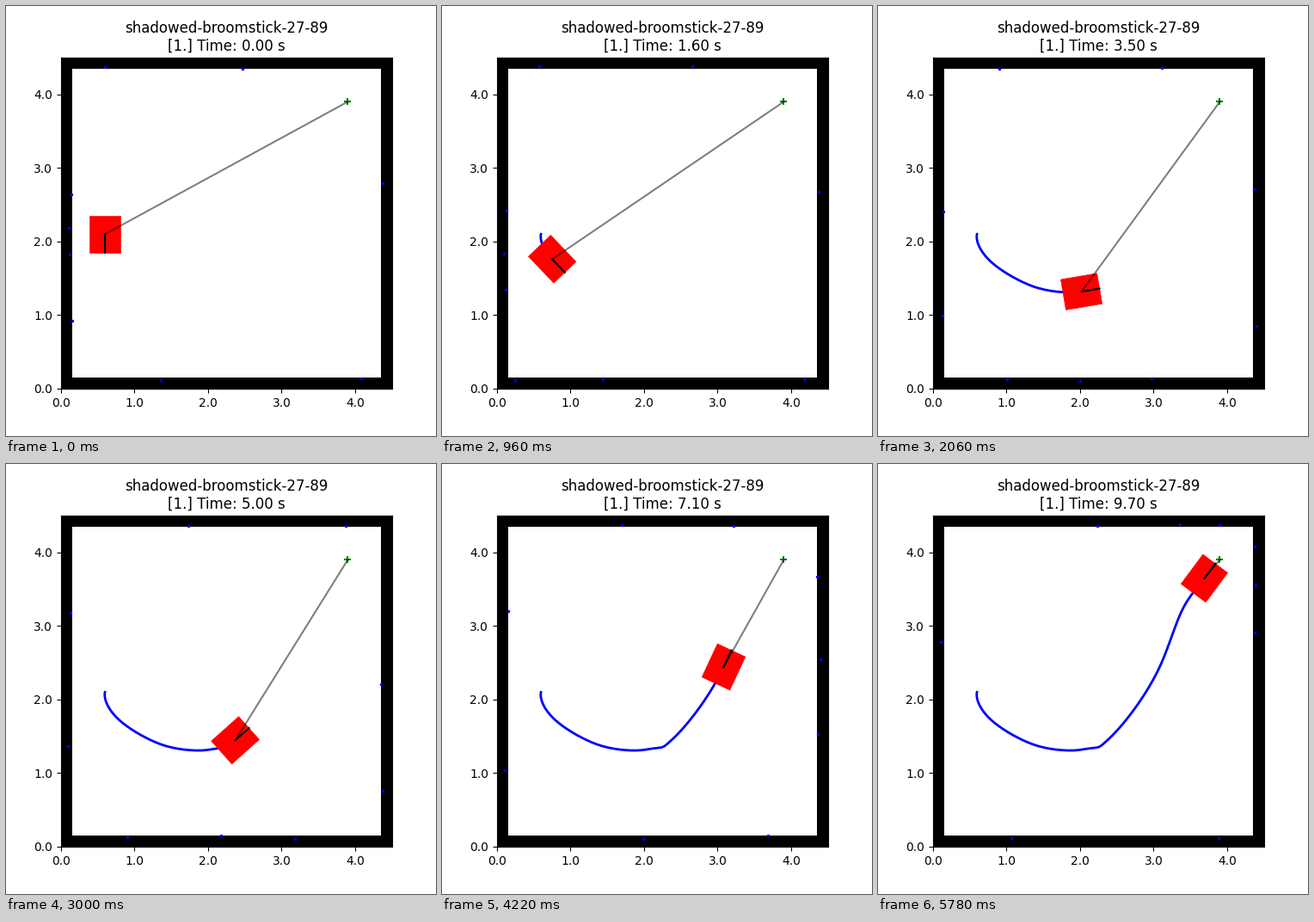
These frames come from a looping animation (500x500 px, 5800 ms). A matplotlib script:

```python
import numpy as np
import matplotlib.pyplot as plt
from matplotlib.animation import FuncAnimation
from matplotlib.patches import Polygon

SIZE, WALL = 4.5, 0.15
GOAL = (3.9, 3.9)
STEPS, DT = 98, 0.1
TICK, LOOP = 20, 5800

# a few poses along the drive: time, x, y, heading in degrees
POSES = np.array([
    (0.0, 0.600, 2.100, -90.0),
    (1.6, 0.753, 1.761, -46.4),
    (2.6, 1.360, 1.391, -20.0),
    (3.5, 2.020, 1.319, 9.7),
    (5.0, 2.371, 1.446, 41.8),
    (7.1, 3.083, 2.443, 65.0),
    (8.2, 3.347, 3.123, 67.4),
    (9.7, 3.690, 3.647, 53.4),
])


def hermite(t, knots, values, rates):
    i = np.clip(np.searchsorted(knots, t, side="right") - 1, 0, len(knots) - 2)
    h = (knots[i + 1] - knots[i])[:, None]
    u = (t - knots[i])[:, None] / h
    return ((1 + 2 * u) * (1 - u) ** 2 * values[i]
            + u * (1 - u) ** 2 * h * rates[i]
            + u * u * (3 - 2 * u) * values[i + 1]
            + u * u * (u - 1) * h * rates[i + 1])


def drive():
    """Move along the heading at every pose, starting from rest."""
    knots, x, y, deg = POSES.T
    a = np.radians(deg)
    gone = np.append(0, np.cumsum(np.hypot(np.diff(x), np.diff(y))))
    speed, turn = np.gradient(gone, knots), np.gradient(a, knots)
    speed[0] = turn[0] = 0
    rates = np.column_stack([speed * np.cos(a), speed * np.sin(a), turn])
    return hermite(np.arange(STEPS) * DT, knots, np.column_stack([x, y, a]), rates)


# range finder: every 20th of 181 beams, sampled at 100 points up to 5 m
BEAMS = np.pi + np.arange(-4, 5) * 20 * 2 * np.pi / 181
RANGES = np.linspace(0, 5, 100)


def scan(x, y, heading):
    a = heading + BEAMS[:, None]
    px, py = x + RANGES * np.cos(a), y + RANGES * np.sin(a)
    reach = SIZE / 2 - WALL
    hit = np.maximum(abs(px - SIZE / 2), abs(py - SIZE / 2)) > reach
    rows, first = np.arange(len(BEAMS)), hit.argmax(axis=1)
    return px[rows, first], py[rows, first]


def body(x, y, heading, length=0.5, width=0.42):
    c, s = np.cos(heading), np.sin(heading)
    corners = np.array([[1, 1], [1, -1], [-1, -1], [-1, 1]]) * [length / 2, width / 2]
    return corners @ np.array([[c, s], [-s, c]]) + [x, y]


path = drive()

fig, ax = plt.subplots(figsize=(5, 5), dpi=100)
cells = np.zeros((30, 30))
cells[1:-1, 1:-1] = 1
ax.imshow(cells, cmap="gray", extent=(0, SIZE, 0, SIZE), origin="lower",
          interpolation="nearest")
ax.set(xlim=(0, SIZE), ylim=(0, SIZE), xticks=range(5), yticks=range(5))
ax.xaxis.set_major_formatter("{x:.1f}")
ax.yaxis.set_major_formatter("{x:.1f}")

trail, = ax.plot([], [], "b", lw=2, zorder=2)
ax.scatter(*GOAL, marker="+", color="green", zorder=2)
robot = ax.add_patch(Polygon(body(0, 0, 0), color="red", lw=0.4, zorder=2.1))
sight, = ax.plot([], [], "k", lw=1.5, alpha=0.5, zorder=2.2)
nose, = ax.plot([], [], "k", lw=1.5, zorder=2.3)
echoes, = ax.plot([], [], "b.", ms=3, zorder=2.6)
title = ax.set_title("")


def update(tick):
    # steps last 20 ms and 100 ms in turn
    pair, rest = divmod(tick * TICK, 120)
    n = 2 * pair + (rest >= 20)
    x, y, a = path[n]
    trail.set_data(path[:n + 1, 0], path[:n + 1, 1])
    robot.set_xy(body(x, y, a))
    sight.set_data([x, GOAL[0]], [y, GOAL[1]])
    nose.set_data([x, x + 0.25 * np.cos(a)], [y, y + 0.25 * np.sin(a)])
    echoes.set_data(*scan(x, y, a))
    title.set_text(f"shadowed-broomstick-27-89\n[1.] Time: {n * DT:.2f} s")
    return trail, robot, sight, nose, echoes, title


anim = FuncAnimation(fig, update, frames=LOOP // TICK, interval=TICK,
                     repeat=True, repeat_delay=0)
plt.show()
```
